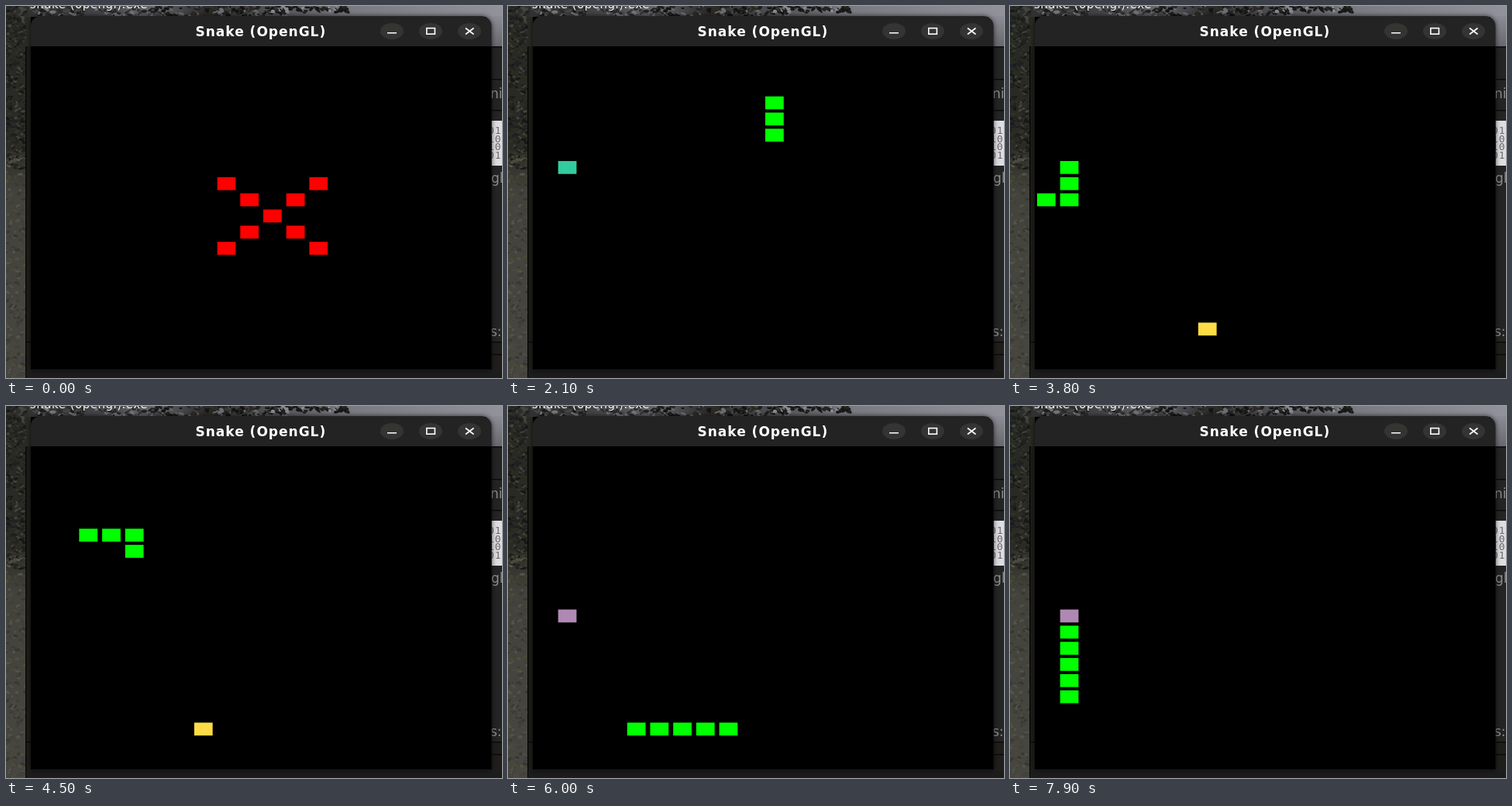
An HTML page with a canvas for the animation above (8000 ms loop, 640 by 480 pixels).

```html
<!DOCTYPE html>
<html lang="en">
<head>
<meta charset="utf-8">
<title>Snake (OpenGL)</title>
<style>
html, body { margin: 0; width: 100%; height: 100%; overflow: hidden; background: #000; }
canvas { display: block; }
</style>
</head>
<body>
<canvas id="stage" width="640" height="480"></canvas>
<script>
const LOOP = 8000, TICK = 100;
const ctx = document.getElementById('stage').getContext('2d');
const desktop = document.createElement('canvas');
desktop.width = 640;
desktop.height = 480;

let seed = 7;
function rand() {
  seed = (seed * 16807) % 2147483647;
  return seed / 2147483647;
}

function rect(c, color, x, y, w, h) {
  c.fillStyle = color;
  c.fillRect(x, y, w, h);
}

function label(c, text, x, y, font, color, spacing = 0) {
  c.font = font;
  c.letterSpacing = spacing + 'px';
  c.fillStyle = color;
  c.fillText(text, x, y);
}

function gradient(c, x0, y0, x1, y1, stops) {
  const g = c.createLinearGradient(x0, y0, x1, y1);
  stops.forEach(([at, color]) => g.addColorStop(at, color));
  return g;
}

function speckle(c, count, x, y, w, h, colors, size) {
  for (let i = 0; i < count; i++) {
    c.fillStyle = colors[Math.floor(rand() * colors.length)];
    c.beginPath();
    c.ellipse(x + rand() * w, y + rand() * h, size * (0.5 + rand()),
      size * (0.3 + rand() * 0.5), rand() * 1.6 - 0.8, 0, 7);
    c.fill();
  }
}

function drawWallpaper(c) {
  // tree on the left, sky on the right
  rect(c, gradient(c, 0, 0, 0, 480, [[0, '#282923'], [0.38, '#2b2b25'],
    [0.5, '#43433c'], [1, '#474641']]), 0, 0, 32, 480);
  rect(c, gradient(c, 0, 0, 640, 0, [[0, '#2a2a28'], [0.2, '#48484c'], [0.3, '#66666c'],
    [0.4, '#2c2c2e'], [0.55, '#55555a'], [0.7, '#7a7a82'], [1, '#92929c']]), 0, 0, 640, 14);
  rect(c, gradient(c, 0, 13, 0, 52, [[0, '#8c8c96'], [1, '#68686e']]), 620, 13, 20, 39);

  c.save();
  c.beginPath();
  c.rect(0, 0, 26, 480);
  c.clip();
  speckle(c, 280, 0, 0, 26, 210, ['#171815', '#20211b', '#34352a', '#44453c', '#1f2024'], 2.5);
  speckle(c, 240, 0, 195, 26, 285, ['#37372e', '#4c4b3a', '#53534c', '#3f3f40', '#444334'], 2.5);
  c.restore();

  c.save();
  c.beginPath();
  c.rect(0, 0, 640, 13);
  c.clip();
  speckle(c, 130, 190, 0, 170, 13, ['#141414', '#1f1f1c', '#2a2a22', '#6c6c72'], 3);
  speckle(c, 60, 340, 0, 100, 8, ['#171718', '#25251f', '#8a8a92'], 3);
  speckle(c, 110, 20, 0, 180, 13, ['#1e1e1c', '#2c2c28', '#48484c', '#77777e'], 3);
  c.restore();
}

function drawBackWindow(c) {
  rect(c, '#1f1e1b', 25, 52, 615, 428);
  rect(c, '#080808', 25, 52, 1.5, 428);
  rect(c, '#242424', 627, 52, 13, 381);
  for (const y of [52, 94, 134, 433, 449]) rect(c, '#0b0b0c', 626, y, 14, 1.5);
  rect(c, '#0b0b0c', 25, 433, 8, 1.5);
  rect(c, '#1c1c24', 32, 469, 594, 2);
  rect(c, '#1c1c1c', 26, 471, 614, 9);

  const font = '17px "DejaVu Sans", sans-serif';
  label(c, 'ni', 625, 119, font, '#8d8d8c');
  label(c, 'gl', 626, 228, font, '#8d8d8c');
  label(c, 's:', 625, 426, font, '#8d8d8c');
  rect(c, '#dedde2', 625, 148, 15, 58);
  ['01', '10', '10', '01'].forEach((row, i) =>
    label(c, row, 622, 165 + i * 10.5, '13px "DejaVu Sans Mono", monospace', '#6c6966', 1));
}

function drawWindow(c) {
  c.save();
  c.shadowColor = 'rgba(0,0,0,.7)';
  c.shadowBlur = 6;
  c.fillStyle = '#232323';
  c.beginPath();
  c.roundRect(32, 13, 594.5, 456.5, [13, 13, 2, 2]);
  c.fill();
  c.restore();
  rect(c, '#000', 32, 52, 594.5, 417);
  label(c, 'Snake (OpenGL)', 244.5, 38.5, 'bold 17px "DejaVu Sans", sans-serif', '#fff', 1);

  for (const x of [498, 548, 598]) {
    c.fillStyle = '#343433';
    c.beginPath();
    c.ellipse(x, 32.5, 15, 10.5, 0, 0, 7);
    c.fill();
  }
  rect(c, '#fff', 492, 34, 12, 1.5);
  c.strokeStyle = '#fff';
  c.lineWidth = 1.6;
  c.strokeRect(542.8, 28.6, 10.6, 7.6);
  c.beginPath();
  c.moveTo(593, 28.5);
  c.lineTo(603.5, 36.5);
  c.moveTo(603.5, 28.5);
  c.lineTo(593, 36.5);
  c.stroke();
}

function drawDesktop(c) {
  drawWallpaper(c);
  label(c, 'snake (opengl).exe', 31, 3, '15px "DejaVu Sans", sans-serif', '#f2f2f2', 0.5);
  drawBackWindow(c);
  drawWindow(c);
}

// Corners of the head's route, one cell per tick
const corners = [[11, 10], [6, 10], [6, 1], [10, 1], [10, 6], [2, 6], [0, 6], [0, 9],
  [1, 9], [1, 5], [4, 5], [4, 17], [11, 17], [11, 15], [1, 15], [1, 11]];
const route = [corners[0]];
corners.slice(1).forEach(([cx, cy]) => {
  let [x, y] = route[route.length - 1];
  while (x !== cx || y !== cy) {
    x += Math.sign(cx - x);
    y += Math.sign(cy - y);
    route.push([x, y]);
  }
});

const foods = [
  { at: [1, 7], color: '#33cc9e', eaten: 38 },
  { at: [7, 17], color: '#ffdb48', eaten: 58 },
  { at: [1, 10], color: '#b088b4', eaten: Infinity }
];

// 20 by 20 cells, each filled to 80 percent
const CELL_W = 29.7, CELL_H = 20.85;

function cell([col, row], color) {
  rect(ctx, color, 32 + (col + 0.1) * CELL_W, 52 + (row + 0.1) * CELL_H,
    CELL_W * 0.8, CELL_H * 0.8);
}

function drawCross() {
  for (let i = -2; i <= 2; i++) {
    cell([10 + i, 10 + i], '#f00');
    if (i) cell([10 + i, 10 - i], '#f00');
  }
}

function drawGame(tick) {
  if (tick === 0) return drawCross();
  const move = tick > 38 ? tick - 1 : tick;   // short wait at the first bite
  const eaten = foods.filter(f => move >= f.eaten).length;
  const food = foods[eaten];
  cell(food.at, food.color);
  const head = move + 1;
  for (let i = 0; i < 3 + eaten; i++) cell(route[head - i], '#0f0');
}

function frame(now) {
  const tick = Math.floor(((now - start + LOOP) % LOOP) / TICK);
  ctx.drawImage(desktop, 0, 0);
  drawGame(tick);
  requestAnimationFrame(frame);
}

drawDesktop(desktop.getContext('2d'));
const start = performance.now();
frame(start);
</script>
</body>
</html>
```
